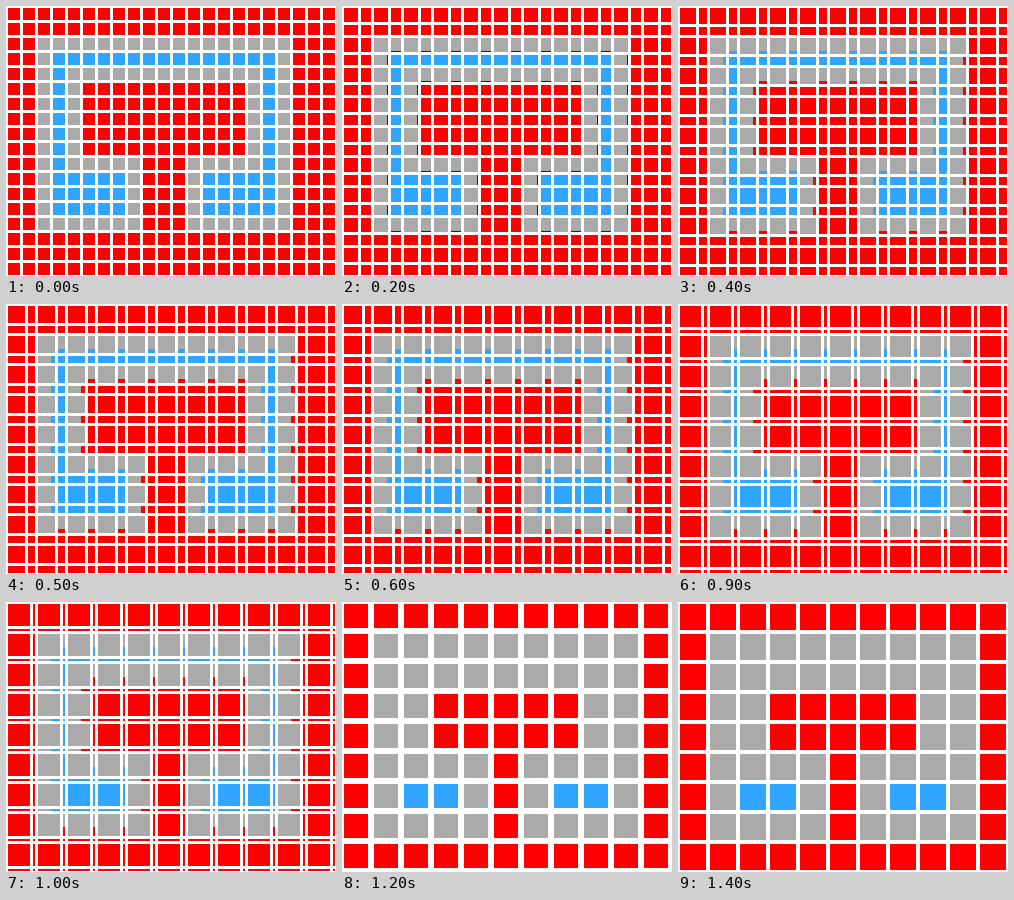
These frames come from a looping animation (330 by 270 pixels, 2.2 s). An HTML page:

```html
<!DOCTYPE html>
<html lang="en">
<head>
<meta charset="utf-8">
<title>Grid merge</title>
<style>
  html, body { margin: 0; width: 330px; height: 270px; overflow: hidden; background: #fff; }
  svg { display: block; }
</style>
</head>
<body>
<svg id="stage" width="330" height="270" viewBox="0 0 330 270" shape-rendering="crispEdges"></svg>
<script>
const LOOP = 2200, STEP = 100, LAST = 14, PITCH = 15, COLS = 22, ROWS = 18;
const COLORS = { r: '#ff0000', g: '#aaaaaa', b: '#30a5ff', k: '#222222' };

// Columns 2 to 18 of the figure; everything around it is red.
const bar = 'gbgggggggggggggbg';
const hollow = 'gbgrrrrrrrrrrrgbg';
const foot = 'gbbbbbgrrrgbbbbbg';
const figure = [
  'ggggggggggggggggg', 'gbbbbbbbbbbbbbbbg', bar,
  ...Array(5).fill(hollow),
  'gbgggggrrrgggggbg', ...Array(3).fill(foot),
  'gggggggrrrggggggg'
];
const colorAt = (c, r) => figure[r - 2]?.[c - 2] ?? 'r';

const stage = document.getElementById('stage');
const paths = {};
for (const key in COLORS) {
  paths[key] = document.createElementNS('http://www.w3.org/2000/svg', 'path');
  paths[key].setAttribute('fill', COLORS[key]);
  stage.append(paths[key]);
}

// Even lines grow while odd lines shrink towards their far edge.
const span = (i, k) => i % 2
  ? { pos: i * PITCH + 2 + k, size: 12 - k }
  : { pos: i * PITCH + 2, size: 12 + k };

function draw(k) {
  const d = { r: '', g: '', b: '', k: '' };
  const rect = (key, x, y, w, h) => {
    if (w > 0 && h > 0) d[key] += `M${x} ${y}h${w}v${h}h${-w}z`;
  };
  const extra = Math.max(0, k - 1);

  for (let r = 0; r < ROWS; r++) {
    for (let c = 0; c < COLS; c++) {
      const x = span(c, k), y = span(r, k), own = colorAt(c, r);
      const wide = c % 2 === 0 && r % 2 === 1;
      const tall = c % 2 === 1 && r % 2 === 0;
      const w = x.size - (wide ? extra : 0);
      const h = y.size - (tall ? extra : 0);
      rect(own, x.pos, y.pos, w, h);
      if (!extra || !(wide || tall)) continue;

      // The part past the cell border shows the neighbour; a hairline is dark.
      const next = wide ? colorAt(c + 1, r) : colorAt(c, r + 1);
      const key = next !== own && extra === 1 ? 'k' : next;
      if (wide) rect(key, x.pos + w, y.pos, extra, h);
      else rect(key, x.pos, y.pos + h, w, extra);
    }
  }
  for (const key in d) paths[key].setAttribute('d', d[key]);
}

let shown = 0;
draw(0);
const start = performance.now();
function tick() {
  const t = (performance.now() - start) % LOOP;
  const k = Math.min(LAST, Math.floor(t / STEP));
  if (k !== shown) draw(shown = k);
  requestAnimationFrame(tick);
}
requestAnimationFrame(tick);
</script>
</body>
</html>
```
